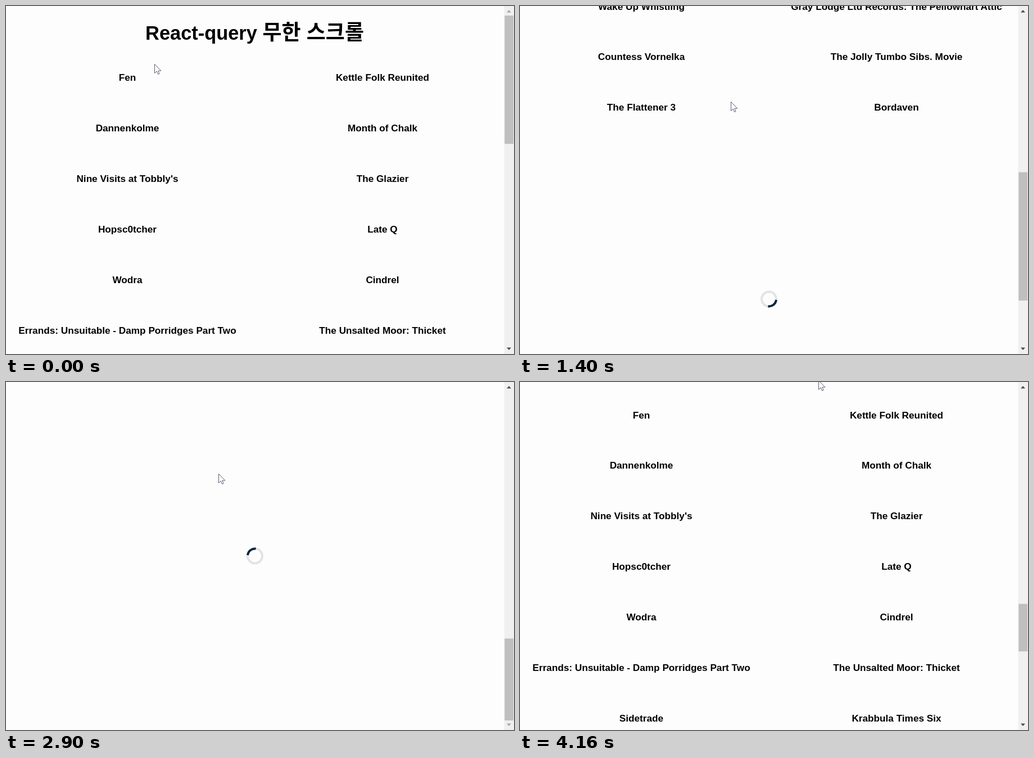
An HTML page for the animation above (4190 ms loop, 904 px wide and 619 px high).

```html
<!DOCTYPE html>
<html lang="ko">
<head>
<meta charset="utf-8">
<title>React-query 무한 스크롤</title>
<style>
html, body { margin: 0; width: 100%; height: 100%; overflow: hidden; background: #fdfdfd; }
svg { display: block; }
text { font: bold 17.2px "Liberation Sans", Arial, sans-serif; text-anchor: middle; fill: #000; }
.title { font-size: 34.4px; }
.hangul { font-family: "Noto Sans CJK KR", "Noto Sans CJK JP", sans-serif; font-size: 37px; }
</style>
</head>
<body>
<svg width="904" height="619" viewBox="0 0 904 619">
  <g id="page">
    <text class="title" x="442.5" y="60">React-query <tspan class="hangul">무한 스크롤</tspan></text>
    <g id="list"></g>
    <g id="spinner" fill="none" stroke-width="4">
      <circle r="13" stroke="#e3e3e5"/>
      <path d="M9.19-9.19A13 13 0 0 1 9.19 9.19" stroke="#08243f"/>
    </g>
  </g>
  <rect x="886.5" width="17.5" height="619" fill="#f0f0f1"/>
  <rect id="thumb" x="887.3" width="15.7" fill="#bfbfbf"/>
  <path id="up" d="M891 11.5h8l-4-4.5z"/>
  <path id="down" d="M891 607.5h8l-4 4.5z"/>
  <path id="cursor" d="M.5.5V16.5L4.2 13L6.6 18.5L9 17.5L6.8 12.2H11.8Z" fill="#fff" stroke="#4a4a62" stroke-width=".9"/>
</svg>
<script>
const LOOP = 4190, STEP = 10, VIEW = 619, PITCH = 89.9, TRACK = 585, BASE = 1586.5;
const titles = [
  "Fen", "Kettle Folk Reunited",
  "Dannenkolme", "Month of Chalk",
  "Nine Visits at Tobbly's", "The Glazier",
  "Hopsc0tcher", "Late Q",
  "Wodra", "Cindrel",
  "Errands: Unsuitable - Damp Porridges Part Two", "The Unsalted Moor: Thicket",
  "Sidetrade", "Krabbula Times Six",
  "Wake Up Whistling", "Gray Lodge Ltd Records: The Pellowhart Attic",
  "Countess Vornelka", "The Jolly Tumbo Sibs. Movie",
  "The Flattener 3", "Bordaven"
];
const loads = [1830, 3000, 4040];
// keys: time, then values
const scrollKeys = [[380, 0], [650, 200], [754, 200], [1005, 500], [1290, 500], [1497, 967.5],
  [2190, 967.5], [2668, 1866.5], [3210, 1866.5], [3574, 2765.5]];
const cursorKeys = [[160, 264, 103], [420, 372, 174], [900, 372, 174], [1030, 375, 170],
  [2730, 375, 170], [3200, 386, 147], [3740, 386, 147], [4160, 531, -3]];

const $ = id => document.getElementById(id);
const set = (el, attrs) => { for (const k in attrs) el.setAttribute(k, attrs[k]); };

function valueAt(keys, t) {
  const i = keys.findIndex(k => k[0] > t);
  if (i === 0) return keys[0].slice(1);
  if (i < 0) return keys[keys.length - 1].slice(1);
  const a = keys[i - 1], b = keys[i];
  const u = (t - a[0]) / (b[0] - a[0]), e = u * u * (3 - 2 * u);
  return a.slice(1).map((v, j) => v + (b[j + 1] - v) * e);
}

const pages = [0, 1, 2, 3].map(p => {
  const group = document.createElementNS("http://www.w3.org/2000/svg", "g");
  titles.forEach((title, i) => {
    const text = document.createElementNS("http://www.w3.org/2000/svg", "text");
    text.textContent = title;
    set(text, { x: i % 2 ? 670 : 216, y: 133 + (p * 10 + (i >> 1)) * PITCH });
    group.append(text);
  });
  $("list").append(group);
  return group;
});

function draw(now) {
  const t = Math.round(now / STEP) * STEP % LOOP;
  const loaded = loads.filter(at => t >= at).length;
  const height = BASE + loaded * 10 * PITCH;
  const [scroll] = valueAt(scrollKeys, t);
  const [x, y] = valueAt(cursorKeys, t);
  const arrow = enabled => ({ fill: enabled ? "#4c4c4c" : "#a6a6a6" });

  pages.forEach((g, p) => set(g, { visibility: p <= loaded ? "visible" : "hidden" }));
  set($("page"), { transform: `translate(0 ${-scroll})` });
  set($("spinner"), { transform: `translate(443 ${height - VIEW / 2}) rotate(${52 + (t - 1400) * .36})` });
  set($("thumb"), { y: 17 + scroll * TRACK / height, height: VIEW * TRACK / height });
  set($("up"), arrow(scroll > 0));
  set($("down"), arrow(scroll < height - VIEW - .5));
  set($("cursor"), { transform: `translate(${Math.round(x)} ${Math.round(y)})` });
}

const start = performance.now();
function tick() {
  draw(performance.now() - start);
  requestAnimationFrame(tick);
}
tick();
</script>
</body>
</html>
```
